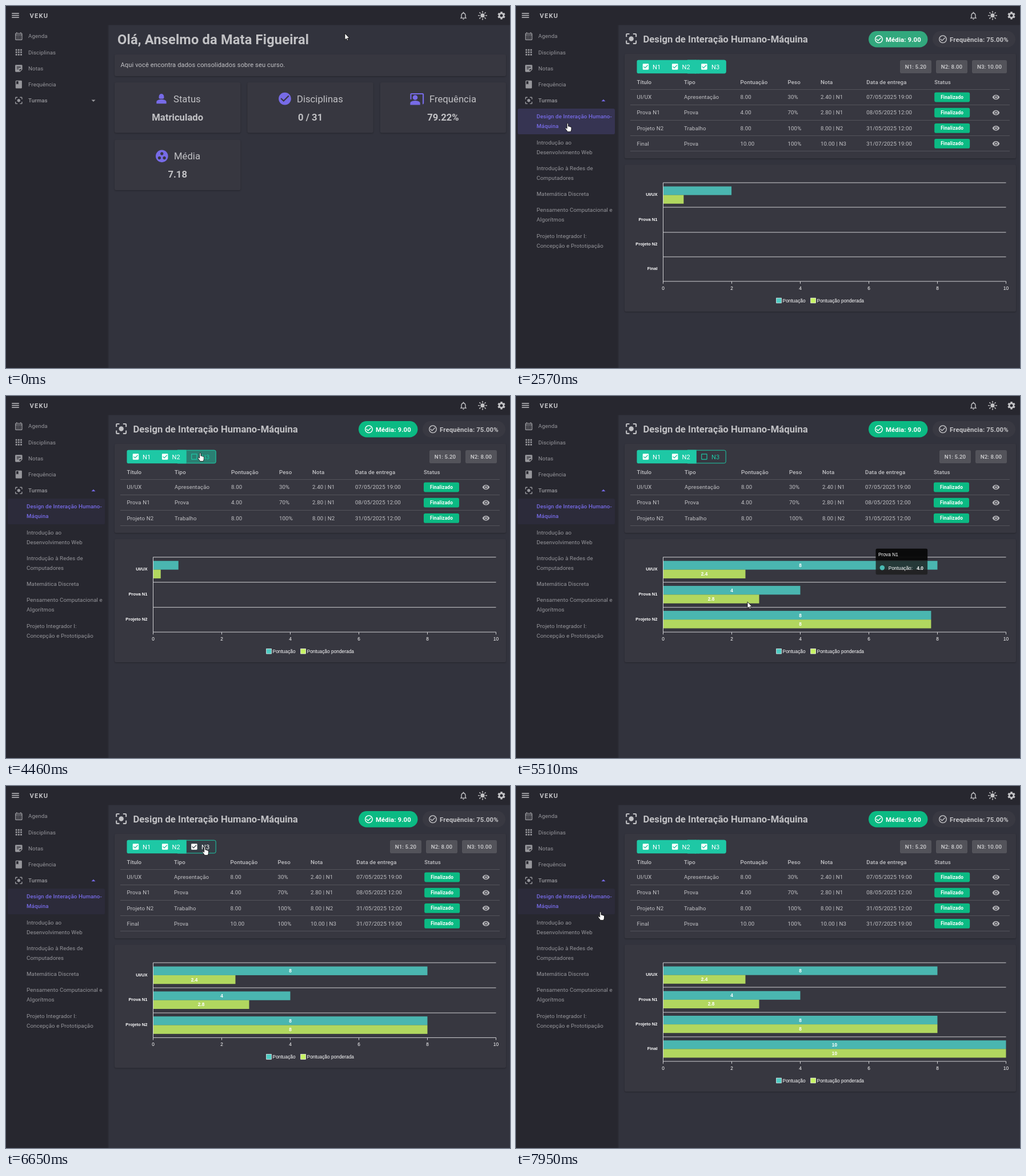
These frames come from a looping animation (882x635 px, 7.99 s). An HTML page:

```html
<!DOCTYPE html>
<html lang="pt">
<head>
<meta charset="utf-8">
<title>Painel do aluno</title>
<style>
  html, body { margin: 0; width: 100%; height: 100%; overflow: hidden; background: #32333d; }
  svg { display: block; width: 882px; height: 635px; font-family: Roboto, "Open Sans", sans-serif; }
  .card { fill: #373740; filter: drop-shadow(0 1.4px 1px rgba(0, 0, 0, .28)); }
  .chart text { font-family: "Liberation Sans", Arial, sans-serif; }
</style>
</head>
<body>
<svg id="stage" viewBox="0 0 882 635"></svg>
<script>
const LOOP = 7990;
const TEXT = '#c2c2c5', DIM = '#97979c', VIOLET = '#776be7', GREEN = '#0bba83', TEAL = '#1ec8a5';
const SERIES = ['#4ecdc4', '#c7f464'];

const ICONS = {
  menu: 'M3 18h18v-2H3v2zm0-5h18v-2H3v2zm0-7v2h18V6H3z',
  bell: 'M12 22c1.1 0 2-.9 2-2h-4c0 1.1.89 2 2 2zm6-6v-5c0-3.07-1.63-5.64-4.5-6.32V4c0-.83-.67-1.5-1.5-1.5s-1.5.67-1.5 1.5v.68C7.64 5.36 6 7.92 6 11v5l-2 2v1h16v-1l-2-2zm-2 1H8v-6c0-2.48 1.51-4.5 4-4.5s4 2.02 4 4.5v6z',
  gear: 'M19.14 12.94c.04-.3.06-.61.06-.94 0-.32-.02-.64-.07-.94l2.03-1.58c.18-.14.23-.41.12-.61l-1.92-3.32c-.12-.22-.37-.29-.59-.22l-2.39.96c-.5-.38-1.03-.7-1.62-.94l-.36-2.54c-.04-.24-.24-.41-.48-.41h-3.84c-.24 0-.43.17-.47.41l-.36 2.54c-.59.24-1.13.57-1.62.94l-2.39-.96c-.22-.08-.47 0-.59.22L2.74 8.87c-.12.21-.08.47.12.61l2.03 1.58c-.05.3-.09.63-.09.94s.02.64.07.94l-2.03 1.58c-.18.14-.23.41-.12.61l1.92 3.32c.12.22.37.29.59.22l2.39-.96c.5.38 1.03.7 1.62.94l.36 2.54c.05.24.24.41.48.41h3.84c.24 0 .44-.17.47-.41l.36-2.54c.59-.24 1.13-.56 1.62-.94l2.39.96c.22.08.47 0 .59-.22l1.92-3.32c.12-.22.07-.47-.12-.61l-2.01-1.58zM12 15.6c-1.98 0-3.6-1.62-3.6-3.6s1.62-3.6 3.6-3.6 3.6 1.62 3.6 3.6-1.62 3.6-3.6 3.6z',
  calendar: 'M19 4h-1V2h-2v2H8V2H6v2H5c-1.11 0-1.99.9-1.99 2L3 20c0 1.1.89 2 2 2h14c1.1 0 2-.9 2-2V6c0-1.1-.9-2-2-2zm0 16H5V10h14v10zm0-12H5V6h14v2zM9 14H7v-2h2v2zm4 0h-2v-2h2v2zm4 0h-2v-2h2v2zm-8 4H7v-2h2v2zm4 0h-2v-2h2v2zm4 0h-2v-2h2v2z',
  apps: 'M4 4h4v4H4zM10 4h4v4h-4zM16 4h4v4h-4zM4 10h4v4H4zM10 10h4v4h-4zM16 10h4v4h-4zM4 16h4v4H4zM10 16h4v4h-4zM16 16h4v4h-4z',
  note: 'M19 3H4.99C3.88 3 3.01 3.9 3.01 5L3 19c0 1.1.89 2 1.99 2H15l6-6V5c0-1.1-.9-2-2-2zM7 8h10v2H7V8zm5 6H7v-2h5v2zm2 5.5V14h5.5L14 19.5z',
  book: 'M18 2H6c-1.1 0-2 .9-2 2v16c0 1.1.9 2 2 2h12c1.1 0 2-.9 2-2V4c0-1.1-.9-2-2-2zM6 4h5v8l-2.5-1.5L6 12V4z',
  focus: 'M12 8c-2.21 0-4 1.79-4 4s1.79 4 4 4 4-1.79 4-4-1.79-4-4-4zm-7 7H3v4c0 1.1.9 2 2 2h4v-2H5v-4zM5 5h4V3H5c-1.1 0-2 .9-2 2v4h2V5zm14-2h-4v2h4v4h2V5c0-1.1-.9-2-2-2zm0 16h-4v2h4c1.1 0 2-.9 2-2v-4h-2v4z',
  person: 'M18.39 14.56C16.71 13.7 14.53 13 12 13c-2.53 0-4.71.7-6.39 1.56C4.61 15.07 4 16.1 4 17.22V20h16v-2.78c0-1.12-.61-2.15-1.61-2.66zM9.78 12h4.44c1.21 0 2.14-1.06 1.98-2.26l-.32-2.45C15.57 5.39 13.92 4 12 4S8.43 5.39 8.12 7.29L7.8 9.74c-.16 1.2.77 2.26 1.98 2.26z',
  check: 'M12 2C6.48 2 2 6.48 2 12s4.48 10 10 10 10-4.48 10-10S17.52 2 12 2zm-2 15l-5-5 1.41-1.41L10 14.17l7.59-7.59L19 8l-9 9z',
  checkLine: 'M16.59 7.58 10 14.17l-3.59-3.58L5 12l5 5 8-8zM12 2C6.48 2 2 6.48 2 12s4.48 10 10 10 10-4.48 10-10S17.52 2 12 2zm0 18c-4.42 0-8-3.58-8-8s3.58-8 8-8 8 3.58 8 8-3.58 8-8 8z',
  present: 'M21 3H3c-1.11 0-2 .89-2 2v8h2V5h18v16c1.11 0 2-.89 2-2V5c0-1.11-.9-2-2-2zM9 14a4 4 0 1 0 0-8 4 4 0 0 0 0 8zM15.39 16.56C13.71 15.7 11.53 15 9 15s-4.71.7-6.39 1.56C1.61 17.07 1 18.1 1 19.22V22h16v-2.78c0-1.12-.61-2.15-1.61-2.66z',
  group: 'M12 2C6.48 2 2 6.48 2 12s4.48 10 10 10 10-4.48 10-10S17.52 2 12 2zM8 17.5c-1.38 0-2.5-1.12-2.5-2.5s1.12-2.5 2.5-2.5 2.5 1.12 2.5 2.5-1.12 2.5-2.5 2.5zM9.5 8c0-1.38 1.12-2.5 2.5-2.5s2.5 1.12 2.5 2.5-1.12 2.5-2.5 2.5S9.5 9.38 9.5 8zm6.5 9.5c-1.38 0-2.5-1.12-2.5-2.5s1.12-2.5 2.5-2.5 2.5 1.12 2.5 2.5-1.12 2.5-2.5 2.5z',
  eye: 'M12 4.5C7 4.5 2.73 7.61 1 12c1.73 4.39 6 7.5 11 7.5s9.27-3.11 11-7.5c-1.73-4.39-6-7.5-11-7.5zM12 17c-2.76 0-5-2.24-5-5s2.24-5 5-5 5 2.24 5 5-2.24 5-5 5zm0-8c-1.66 0-3 1.34-3 3s1.34 3 3 3 3-1.34 3-3-1.34-3-3-3z',
  boxOn: 'M19 3H5c-1.11 0-2 .9-2 2v14c0 1.1.89 2 2 2h14c1.11 0 2-.9 2-2V5c0-1.1-.89-2-2-2zm-9 14l-5-5 1.41-1.41L10 14.17l7.59-7.59L19 8l-9 9z',
  boxOff: 'M19 5v14H5V5h14m0-2H5c-1.1 0-2 .9-2 2v14c0 1.1.9 2 2 2h14c1.1 0 2-.9 2-2V5c0-1.1-.9-2-2-2z',
  down: 'M7 10l5 5 5-5z',
  up: 'M7 14l5-5 5 5z'
};

const clamp = v => Math.max(0, Math.min(1, v));
const ramp = (t, from, to) => clamp((t - from) / (to - from));
const mix = (a, b, p) => a + (b - a) * p;
const easeOut = p => 1 - (1 - p) ** 2;
const easeInOut = p => (1 - Math.cos(Math.PI * p)) / 2;

const icon = (name, cx, cy, size, fill) =>
  `<path d="${ICONS[name]}" fill="${fill}" transform="translate(${cx - size / 2} ${cy - size / 2}) scale(${size / 24})"/>`;
const text = (x, y, str, size, { fill = TEXT, weight = 400, anchor = 'start', gap = .01 } = {}) =>
  `<text x="${x}" y="${y}" font-size="${size}" fill="${fill}" font-weight="${weight}" text-anchor="${anchor}" letter-spacing="${gap * size}">${str}</text>`;
const rect = (x, y, w, h, fill, r = 0, more = '') =>
  `<rect x="${x}" y="${y}" width="${w}" height="${h}" rx="${r}" fill="${fill}" ${more}/>`;
const card = (x, y, w, h) => `<rect class="card" x="${x}" y="${y}" width="${w}" height="${h}" rx="2.8"/>`;
const line = (x1, y1, x2, y2, stroke) => `<path d="M${x1} ${y1}L${x2} ${y2}" stroke="${stroke}"/>`;

function topBar() {
  let rays = '';
  for (let a = 0; a < 360; a += 45)
    rays += `<path d="M0 -5.5V-7.3" transform="rotate(${a})" stroke="${TEXT}" stroke-width="1.5" stroke-linecap="round"/>`;
  return rect(0, 0, 882, 33.4, '#27272f') +
    icon('menu', 16.5, 16.5, 16.7, TEXT) +
    text(41.5, 20.7, 'VEKU', 11.1, { weight: 700, gap: .11 }) +
    icon('bell', 800.5, 17, 16.7, TEXT) +
    `<g transform="translate(834 16.7)"><circle r="3.6" fill="${TEXT}"/>${rays}</g>` +
    icon('gear', 867, 16.7, 16.7, TEXT);
}

const NAV = [['calendar', 'Agenda'], ['apps', 'Disciplinas'], ['note', 'Notas'], ['book', 'Frequência'], ['focus', 'Turmas']];
const CLASSES = [
  ['Design de Interação Humano-', 'Máquina'],
  ['Introdução ao', 'Desenvolvimento Web'],
  ['Introdução à Redes de', 'Computadores'],
  ['Matemática Discreta'],
  ['Pensamento Computacional e', 'Algorítmos'],
  ['Projeto Integrador I:', 'Concepção e Prototipação']
];

function sideBar(t) {
  const open = t >= 1470, chosen = t >= 2250;
  let out = rect(178, 33, 2, 602, '#2c2d35') + rect(0, 33, 178, 602, '#27272f');
  NAV.forEach(([name, label], i) => {
    const y = 53 + i * 28.2;
    out += icon(name, 22.3, y, 16.7, DIM) + text(39, y + 3.4, label, 9.73, { fill: DIM, weight: i == 4 ? 500 : 400 });
  });
  out += icon(open ? 'up' : 'down', 153, 165.8, 16.7, open ? VIOLET : DIM);
  if (!open) return out;

  const height = 260 * easeInOut(ramp(t, 1470, 1770));
  const hover = ramp(t, 2050, 2250) * (1 - ramp(t, 2720, 3020));
  const glow = (chosen ? .06 : 0) + .13 * hover;
  let items = rect(3, 180, 170, 45, VIOLET, 2.8, `opacity="${glow}"`);
  let y = 197.2;
  CLASSES.forEach((lines, i) => {
    const style = i == 0 && chosen ? { fill: VIOLET, weight: 500 } : { fill: DIM };
    lines.forEach((s, k) => items += text(36, y + k * 17.2, s, 9.73, style));
    y += lines.length * 17.2 + 10.9;
  });
  return out + `<clipPath id="fold"><rect y="179" width="178" height="${height}"/></clipPath><g clip-path="url(#fold)">${items}</g>`;
}

function homePage() {
  const tiles = [
    [190, 134, 'person', 272, 293, 'Status', 'Matriculado'],
    [422.4, 134, 'check', 488, 509, 'Disciplinas', '0 / 31'],
    [654.7, 134, 'present', 719.3, 741, 'Frequência', '79.22%'],
    [190, 234.6, 'group', 272.8, 294, 'Média', '7.18']
  ];
  return text(195, 66.6, 'Olá, Anselmo da Mata Figueiral', 23.63, { weight: 700, gap: .007 }) +
    card(190, 85, 685, 38) + text(200.5, 107.2, 'Aqui você encontra dados consolidados sobre seu curso.', 11.12) +
    tiles.map(([x, y, name, ix, tx, label, value]) =>
      card(x, y, 220.4, 88.4) + icon(name, ix, y + 28.7, 26, VIOLET) +
      text(tx, y + 34.6, label, 16.7, { gap: 0 }) +
      text(x + 110.2, y + 66.6, value, 16.7, { weight: 700, anchor: 'middle', gap: 0 })).join('');
}

const HEADS = ['Título', 'Tipo', 'Pontuação', 'Peso', 'Nota', 'Data de entrega', 'Status'];
const ROWS = [
  ['UI/UX', 'Apresentação', '8.00', '30%', '2.40 | N1', '07/05/2025 19:00'],
  ['Prova N1', 'Prova', '4.00', '70%', '2.80 | N1', '08/05/2025 12:00'],
  ['Projeto N2', 'Trabalho', '8.00', '100%', '8.00 | N2', '31/05/2025 12:00'],
  ['Final', 'Prova', '10.00', '100%', '10.00 | N3', '31/07/2025 19:00']
];
const COLS = { 4: [211.5, 294, 392.5, 475.5, 533, 613.3, 732.2], 3: [211.5, 295, 394, 478, 536, 611, 731] };

function heading(t) {
  const p = ramp(t, 2400, 2740);
  const pill = `rgb(${mix(90, 11, p)},${mix(149, 186, p)},${mix(119, 131, p)})`;
  return icon('focus', 201.7, 57.4, 25.4, TEXT) +
    text(222.5, 64.4, 'Design de Interação Humano-Máquina', 16.7, { weight: 700, gap: 0 }) +
    rect(617, 44, 103.5, 28.5, pill, 14.2) + icon('checkLine', 635, 58.3, 16.7, '#fff') +
    text(647, 62.5, 'Média: 9.00', 11.4, { fill: '#fff', weight: 700 }) +
    rect(729, 44, 145, 28.5, '#393942', 14.2) + icon('checkLine', 747, 58.3, 16.7, TEXT) +
    text(759, 62.5, 'Frequência: 75.00%', 11.4, { weight: 700 });
}

function toggles(t) {
  const on = t < 4340 || t >= 6600;
  const fill = t < 6000 ? 1 - easeInOut(ramp(t, 4320, 4600)) : ramp(t, 6640, 6860);
  const ink = on ? '#fff' : TEAL;
  return rect(211.5, 94.7, 104, 23.6, TEAL, 2.8) + rect(300, 94.7, 15.5, 23.6, TEAL) +
    rect(315.5, 94.7, 52, 23.6, TEAL, 2.8, `opacity="${fill}"`) +
    rect(312, 95.2, 55.2, 22.6, 'none', 2.8, `stroke="${TEAL}"`) + rect(300, 94.7, 15.5, 23.6, TEAL) +
    (fill > .99 ? rect(313, 94.7, 8, 23.6, TEAL) : '') +
    [0, 1, 2].map(i => icon(i < 2 || on ? 'boxOn' : 'boxOff', 227 + i * 51.2, 106.5, 14, i < 2 ? '#fff' : ink) +
      text(239 + i * 51.5, 110.5, 'N' + (i + 1), 11.12, { fill: i < 2 ? '#fff' : ink })).join('');
}

function table(t, count) {
  const cols = COLS[count];
  const chips = [['N1: 5.20', 55], ['N2: 8.00', 55], ['N3: 10.00', 61]].slice(0, count - 1);
  let out = card(190, 84, 685, 74.4 + count * 27.2) + toggles(t);
  let right = 859;
  chips.reverse().forEach(([label, w]) => {
    out += rect(right - w, 95, w, 23, '#53535a', 2.8) +
      text(right - w / 2, 110, label, 9.73, { weight: 500, anchor: 'middle', fill: '#d2d2d4' });
    right -= w + 8;
  });
  HEADS.forEach((h, i) => out += text(cols[i], 137, h, 9.73, { weight: 500 }));
  out += line(200, 146.5, 864, 146.5, '#53535b');
  ROWS.slice(0, count).forEach((row, r) => {
    const y = 160 + r * 27.15;
    row.forEach((s, i) => out += text(cols[i], y + 3.3, s, 9.73));
    out += rect(cols[6], y - 8.4, 62, 16.8, GREEN, 2.8) +
      text(cols[6] + 31, y + 3, 'Finalizado', 8.34, { fill: '#fff', weight: 700, anchor: 'middle', gap: .02 }) +
      icon('eye', 840, y, 13.9, '#b4b4b8') +
      line(200, Math.round(y + 13) + .5, 864, Math.round(y + 13) + .5, '#53535b');
  });
  return out;
}

const SCORES = [[8, 2.4], [4, 2.8], [8, 8], [10, 10]];
const GROW = 550;

function chart(t, count, top, start) {
  const pitch = count == 4 ? 43.25 : 43.8, axis = pitch * count, stagger = 992 / count;
  const left = 257.5, unit = 60, bar = pitch * .35, grid = '#d0d0d3';
  const shown = ramp(t, start + (count - 2) * stagger + GROW, start + (count - 2) * stagger + GROW + 250);
  let out = '', labels = '';
  for (let i = 0; i < count; i++) {
    const y = i * pitch, p = easeInOut(ramp(t, start + i * stagger, start + i * stagger + GROW));
    out += line(left, Math.round(y), 857.5, Math.round(y), grid) +
      text(247.5, y + pitch / 2 + 1.7, ROWS[i][0], 7.64, { fill: '#fff', weight: 700, anchor: 'end', gap: 0 });
    SCORES[i].forEach((v, k) => {
      const by = y + pitch * .15 + k * bar;
      if (p > 0) out += rect(left, by, v * unit * p, bar, SERIES[k], 0, 'opacity=".85"');
      labels += text(left + v * unit / 2, by + bar / 2 + 3, v, 8.34, { fill: '#fff', weight: 700, anchor: 'middle', gap: 0 });
    });
  }
  out += line(left, axis, 857.5, axis, grid) + line(left, 0, left, axis, grid);
  for (let v = 0; v <= 10; v += 2)
    out += line(left + v * unit, axis, left + v * unit, axis + 4.2, grid) +
      text(left + v * unit, axis + 14.6, v, 8.34, { fill: '#fff', anchor: 'middle', gap: 0 });
  ['Pontuação', 'Pontuação ponderada'].forEach((s, k) => {
    const x = 455.7 + k * 60;
    out += rect(x, axis + 29.2, 8.8, 8.8, SERIES[k], 0, 'stroke="#fff" stroke-width=".7"') +
      text(x + 10.9, axis + 36.7, s, 8.4, { fill: '#fff', gap: 0 });
  });
  return card(190, top, 685, axis + 84.7) +
    `<g class="chart" transform="translate(0 ${top + 31.7})">${out}<g opacity="${shown}">${labels}</g></g>`;
}

function tooltip(t) {
  const late = t > 6700;
  const show = late ? ramp(t, 7020, 7150) * (1 - ramp(t, 7260, 7400)) : ramp(t, 5390, 5450) * (1 - ramp(t, 5640, 5790));
  if (!show) return '';
  const p = late ? 0 : easeOut(ramp(t, 5465, 5615));
  const moved = !late && t >= 5465;
  const x = mix(754, 514, p), y = mix(late ? 272 : 244.5, 289, p);
  return `<g class="chart" opacity="${show}" transform="translate(${x} ${y})">
    <clipPath id="tip"><rect width="91" height="46" rx="3.5"/></clipPath>
    <g clip-path="url(#tip)">${rect(0, 0, 91, 46, '#1e1e1e', 0, 'opacity=".82"')}${rect(0, 0, 91, 20.5, '#000', 0, 'opacity=".7"')}</g>
    ${text(4.7, 13.5, moved ? 'Prova N1' : 'UI/UX', 8.34, { fill: '#fff', gap: 0 })}
    <circle cx="11.5" cy="33.7" r="4.2" fill="${SERIES[0]}" opacity=".88"/>
    ${text(22.5, 37, 'Pontuação:', 8.34, { fill: '#fff', gap: 0 })}
    ${text(72, 37, moved ? '4.0' : '8.0', 8.34, { fill: '#fff', weight: 700, gap: 0 })}</g>`;
}

// Pointer stops: time, x, y
const PATH = [
  [40, 593, 48], [80, 593, 52], [620, 593, 52], [1400, 53, 164], [1750, 53, 164], [2200, 90.5, 206],
  [2680, 90.5, 206], [3050, 150, 218], [3650, 351, 213], [3860, 345, 111], [4170, 340, 100], [5150, 340, 100],
  [5400, 380, 286], [5510, 405, 361], [5620, 410, 375], [5900, 404, 370], [6400, 348, 107], [6750, 348, 107],
  [7060, 335, 322], [7200, 320, 328], [7550, 225, 192], [7950, 148, 221]
];

function pointer(t) {
  let i = PATH.findIndex(k => k[0] > t);
  if (i < 0) i = PATH.length;
  const a = PATH[Math.max(0, i - 1)], b = PATH[Math.min(i, PATH.length - 1)];
  const p = a === b ? 0 : easeInOut(ramp(t, a[0], b[0]));
  const x = mix(a[1], b[1], p), y = mix(a[2], b[2], p);
  const link = x < 173 && y > 40 && y < 430;
  const button = t > 2290 && x > 211 && x < 368 && y > 94 && y < 119;
  const shape = link || button
    ? 'M-1.3 .8C-1.3-.6 1-.6 1 .8V5.2C1.6 4.6 2.9 4.8 3 5.7C3.7 5.2 4.8 5.5 4.9 6.3C5.6 5.9 6.5 6.3 6.5 7.2V10C6.5 12 5.6 12.4 5.4 14.4H-.6C-.9 12.6-3 11-4 9.2C-4.7 8-3.2 7.2-2.3 8.2L-1.3 9.2Z'
    : 'M0 0V11.4L2.6 9L4.3 12.8L6 12.1L4.4 8.4H8Z';
  return `<path d="${shape}" transform="translate(${x} ${y})" fill="#fff" stroke="#000" stroke-width=".8"/>`;
}

function classPage(t) {
  const between = (a, b) => t >= a && t < b;
  const rows = between(4350, 6610) ? 3 : 4;
  const bars = between(4350, 6670) ? 3 : 4;
  const start = t < 4350 ? 2388 : t < 6670 ? 4353 : 6650;
  return heading(t) + table(t, rows) + chart(t, bars, rows == 4 ? 278.3 : 251, start) + tooltip(t);
}

const stage = document.getElementById('stage');
function draw(t) {
  stage.innerHTML = rect(0, 0, 882, 635, '#32333d') + sideBar(t) + topBar() +
    (t < 2290 ? homePage() : classPage(t)) + pointer(t);
}

const begin = performance.now();
function tick() {
  draw((performance.now() - begin) % LOOP);
  requestAnimationFrame(tick);
}
tick();
</script>
</body>
</html>
```
